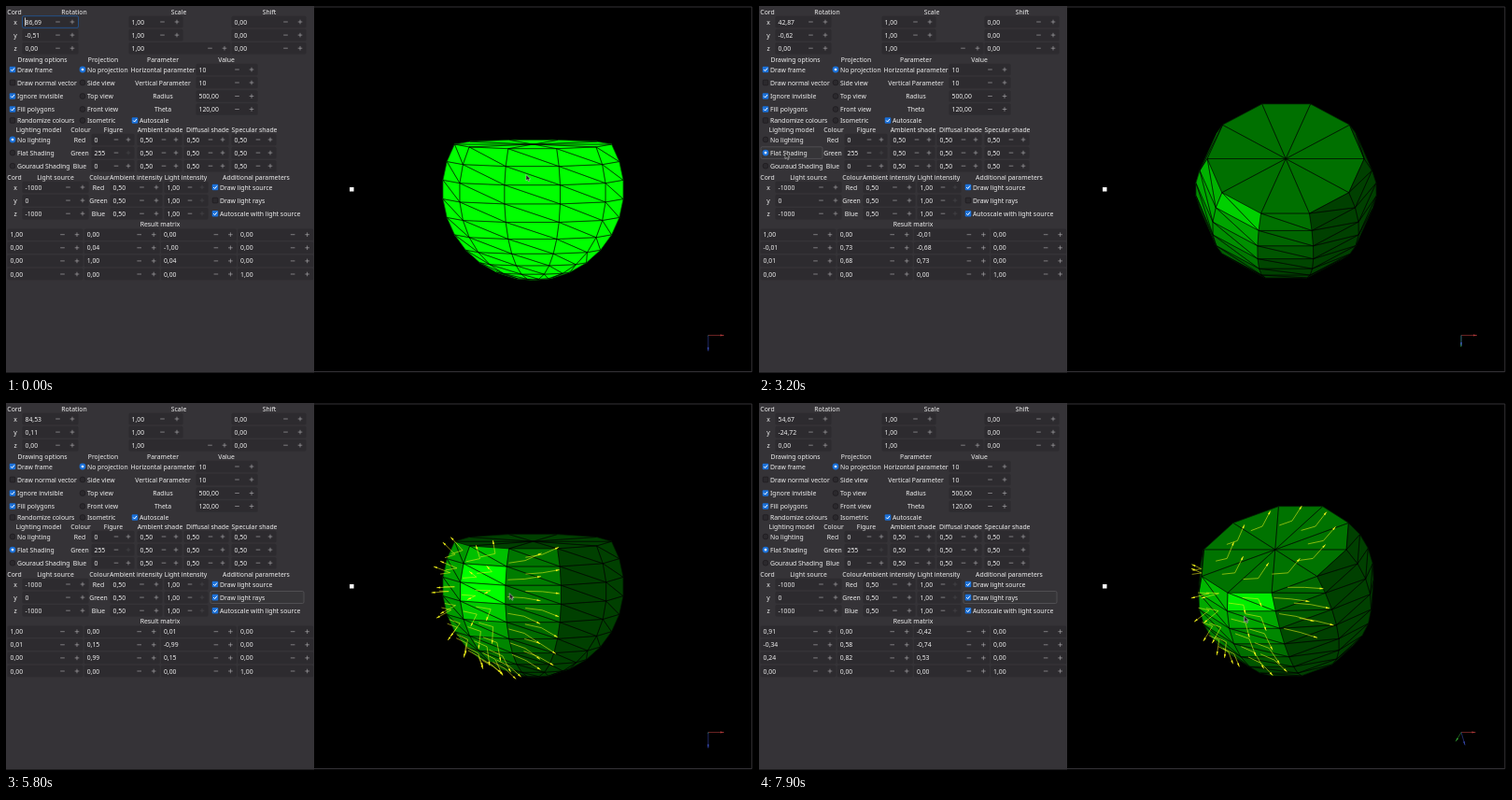
Write an HTML page with a canvas that moves like this. It is 800 px wide and 395 px high and loops after 8 s.

```html
<!DOCTYPE html>
<html lang="en">
<head>
<meta charset="utf-8">
<title>Spherical segment viewer</title>
<style>
  html, body { margin: 0; width: 800px; height: 395px; overflow: hidden; background: #000; }
  canvas, svg { position: absolute; left: 0; top: 0; display: block; }
  text { font: 6.85px "Noto Sans", "Open Sans", sans-serif; fill: #f0f0f0; white-space: pre; }
  .mid { text-anchor: middle; }
  .entry { fill: #2d2b2f; }
  .sign { stroke: #b4b3b5; stroke-width: .6; fill: none; }
  .dim { stroke: #4c4a4e; }
  .off { fill: #2b292d; stroke: #1d1b1f; stroke-width: .7; }
  .on { fill: #1c71d8; }
  .tick { fill: none; stroke: #fff; stroke-width: 1; }
  .focus { fill: none; stroke: #215a9c; stroke-width: .8; }
  .ring { fill: #39373b; fill-opacity: .4; stroke: #5b595d; stroke-width: .7; }
</style>
</head>
<body>
<canvas id="scene" width="800" height="395"></canvas>
<svg id="panel" width="800" height="395" viewBox="0 0 800 395"></svg>
<script>
const svg = document.getElementById('panel');
const ctx = document.getElementById('scene').getContext('2d');

// ---------- panel ----------
function add(tag, attrs, parent = svg) {
  const el = document.createElementNS('http://www.w3.org/2000/svg', tag);
  for (const key in attrs) el.setAttribute(key, attrs[key]);
  return parent.appendChild(el);
}
function label(x, y, str, cls = '') {
  const el = add('text', { x, y: y + 2.5, class: cls });
  el.textContent = str;
  return el;
}
const mid = (x, y, str) => label(x, y, str, 'mid');
const heads = (y, list) => list.forEach(([x, str]) => mid(x, y, str));

function entry(x, right, y, str, full) {
  const plus = right - 7, minus = plus - (right - x < 50 ? 13 : 15.5);
  add('rect', { x: x + .5, y: y - 6.3, width: right - x - 1, height: 12.6, rx: 1.5, class: 'entry' });
  add('path', { d: `M${minus - 2.3} ${y}h4.6`, class: 'sign' });
  add('path', { d: `M${plus - 2.3} ${y}h4.6m-2.3 -2.3v4.6`, class: full ? 'sign dim' : 'sign' });
  return label(x + 3.5, y, str);
}
function check(x, y, str, checked) {
  add('rect', { x: x - 2.8, y: y - 2.8, width: 5.6, height: 5.6, rx: 1, class: 'off' });
  const mark = add('g', {});
  add('rect', { x: x - 3.3, y: y - 3.3, width: 6.6, height: 6.6, rx: 1.2, class: 'on' }, mark);
  add('path', { d: `M${x - 1.8} ${y}l1.4 1.5l2.4 -3`, class: 'tick' }, mark);
  label(x + 5, y, str);
  show(mark, checked);
  return mark;
}
function radio(x, y, str, checked) {
  add('circle', { cx: x, cy: y, r: 2.9, class: 'off' });
  const mark = add('g', {});
  add('circle', { cx: x, cy: y, r: 3.4, class: 'on' }, mark);
  add('circle', { cx: x, cy: y, r: 1.3, fill: '#fff' }, mark);
  label(x + 5, y, str);
  show(mark, checked);
  return mark;
}
function show(el, visible) { el.style.display = visible ? '' : 'none'; }

add('rect', { width: 330, height: 392.5, fill: '#353337' });
add('path', { d: 'M330 1H798.8V391.5H330', fill: 'none', stroke: '#353337' });

heads(6, [[9, 'Cord'], [73, 'Rotation'], [185, 'Scale'], [282, 'Shift']]);
const angles = ['x', 'y', 'z'].map((axis, i) => {
  const y = 17 + 14.1 * i;
  mid(10, y, axis);
  entry(131, i < 2 ? 190 : 241, y, '1,00');
  entry(241, 322, y, '0,00');
  return entry(17, 78, y, '0,00');
});

heads(57, [[39, 'Drawing options'], [104, 'Projection'], [168, 'Parameter'], [236, 'Value']]);
const optionRows = [68, 82, 96.5, 110.5, 122.5];
[['Draw frame', true], ['Draw normal vector', false], ['Ignore invisible', true],
  ['Fill polygons', true], ['Randomize colours', false]]
  .forEach(([str, checked], i) => check(7, optionRows[i], str, checked));
['No projection', 'Side view', 'Top view', 'Front view', 'Isometric']
  .forEach((str, i) => radio(82, optionRows[i], str, i === 0));
[['Horizontal parameter', '10'], ['Vertical Parameter', '10'], ['Radius', '500,00'], ['Theta', '120,00']]
  .forEach(([str, val], i) => { mid(168, optionRows[i], str); entry(203, 270, optionRows[i], val); });
check(138, 122.5, 'Autoscale', true);

heads(132, [[35, 'Lighting model'], [80, 'Colour'], [115, 'Figure'], [165, 'Ambient shade'],
  [216, 'Diffusal shade'], [266, 'Specular shade']]);
const flatRing = add('rect', { x: 2, y: 150.8, width: 66, height: 12.6, rx: 1.5, class: 'ring' });
const colours = ['Red', 'Green', 'Blue'];
const models = ['No lighting', 'Flat Shading', 'Gouraud Shading'].map((str, i) => {
  const y = 143 + 14.1 * i;
  mid(79, y, colours[i]);
  entry(91, 138, y, i === 1 ? '255' : '0', i === 1);
  [140, 190, 241].forEach(x => entry(x, x + 49, y, '0,50'));
  return radio(7, y, str, false);
});

heads(183, [[9, 'Cord'], [53, 'Light source'], [100, 'Colour'], [139.3, 'Ambient intensity'],
  [192.5, 'Light intensity'], [268, 'Additional parameters']]);
const raysRing = add('rect', { x: 219, y: 201.5, width: 100, height: 13, rx: 1.5, class: 'ring' });
const extras = ['Draw light source', 'Draw light rays', 'Autoscale with light source'].map((str, i) => {
  const y = 194 + 14.1 * i;
  mid(10, y, 'xyz'[i]);
  entry(17, 89, y, i === 1 ? '0' : '-1000');
  mid(99, y, colours[i]);
  entry(111, 168, y, '0,50');
  entry(169, 217, y, '1,00', true);
  return check(224, y, str, true);
});

mid(165, 233.5, 'Result matrix');
const cells = [];
for (let r = 0; r < 4; r++)
  for (let c = 0; c < 4; c++)
    cells.push(entry(1 + 82.2 * c, 83 + 82.2 * c, 244.7 + 14.1 * r, r === 3 && c === 3 ? '1,00' : '0,00'));

const focus = add('rect', { x: 17.5, y: 10.7, width: 60, height: 12.6, rx: 1.5, class: 'focus' });
const caret = add('path', { d: 'M20.5 12.5v9', stroke: '#fff', 'stroke-width': .7 });
const pointer = add('path', { d: 'M0 0V6.6L1.6 5.2L2.8 7.6L3.9 7L2.8 4.8H4.8Z',
  fill: '#222', stroke: '#ddd', 'stroke-width': .5 });

// ---------- motion ----------
const TURN = [
  [-40, 87.7, 0], [0, 86.69, -.51], [400, 67, -14], [760, 43.95, -29.8], [800, 43.93, -31.71],
  [1000, 44, -36], [1400, 47, -20], [1900, 43.2, -2], [2300, 42.87, -.62], [4500, 42.87, -.62],
  [5260, 54.3, -.15], [5300, 56.02, -.12], [5600, 71, 1], [6000, 97, -2], [6360, 109.8, -14],
  [6400, 109.65, -15.56], [6700, 107, -28], [7000, 99, -35], [7360, 80.8, -30.7],
  [7400, 79.34, -29.85], [7700, 60, -25.5], [7850, 54.67, -24.72], [8000, 54.67, -24.72]];
const WALK = [[2600, 557, 217], [3100, 28, 157], [3500, 28, 157], [4000, 224, 206],
  [4100, 224, 206], [4450, 538.6, 238.8]];
const FLAT_AT = 3100, RAYS_AT = 4000;
const LAG = 40; // the matrix readout trails the figure

// monotone cubic through [time, a, b] keys
function follow(keys, t) {
  let i = 0;
  while (i < keys.length - 2 && keys[i + 1][0] <= t) i++;
  const h = keys[i + 1][0] - keys[i][0], u = (t - keys[i][0]) / h;
  return [1, 2].map(c => {
    const rate = n => (keys[n + 1][c] - keys[n][c]) / (keys[n + 1][0] - keys[n][0]);
    const tangent = n => {
      if (n === 0 || n === keys.length - 1) return 0;
      const a = rate(n - 1), b = rate(n);
      return a * b > 0 ? 2 * a * b / (a + b) : 0;
    };
    const p = keys[i][c], q = keys[i + 1][c], v = 1 - u;
    return p * v * v * (1 + 2 * u) + q * u * u * (3 - 2 * u) + h * u * v * (v * tangent(i) - u * tangent(i + 1));
  });
}
function pointerAt(t, [rx, ry]) {
  if (t <= 2600) return [557.4 + ry / 1.2, 180.5 + (86.69 - rx) / 1.22];
  if (t >= 4450) return [539 + (ry + .12) / 1.27, 227 + (56.02 - rx) / 1.22];
  return follow(WALK, t);
}

// ---------- solid ----------
const R = 500, SIDES = 10, RINGS = 10, SCALE = .194, CX = 564.5, CY = 196.5;
const LIGHT = [-1000, 0, -1000], RAY = 105;
const sum = (a, b, k = 1) => a.map((v, i) => v + k * b[i]);
const dot = (a, b) => a[0] * b[0] + a[1] * b[1] + a[2] * b[2];
const unit = a => a.map(v => v / Math.hypot(...a));
const cross = (a, b) => [a[1] * b[2] - a[2] * b[1], a[2] * b[0] - a[0] * b[2], a[0] * b[1] - a[1] * b[0]];
const centre = pts => pts.reduce((s, p) => sum(s, p, 1 / pts.length), [0, 0, 0]);

function point(side, ring) {
  const lon = side * 2 * Math.PI / SIDES, lat = ring * Math.PI * 2 / 3 / RINGS;
  return [R * Math.sin(lat) * Math.cos(lon), R * Math.sin(lat) * Math.sin(lon), R * Math.cos(lat)];
}
// each face is a list of coplanar triangles
const faces = [[]];
for (let s = 0; s < SIDES; s++) {
  faces[0].push([[0, 0, -R / 2], point(s, RINGS), point(s + 1, RINGS)]);
  for (let r = 0; r < RINGS; r++) {
    const a = point(s, r), b = point(s + 1, r), c = point(s + 1, r + 1), d = point(s, r + 1);
    faces.push(r ? [[a, b, c], [a, c, d]] : [[a, c, d]]);
  }
}

function matrix([rx, ry]) {
  const a = rx * Math.PI / 180, b = ry * Math.PI / 180;
  const c = Math.cos(a), s = Math.sin(a), cy = Math.cos(b), sy = Math.sin(b);
  return [[cy, 0, sy], [s * sy, c, -s * cy], [-c * sy, s, c * cy]];
}
const turn = (p, m) => [0, 1, 2].map(i => p[0] * m[0][i] + p[1] * m[1][i] + p[2] * m[2][i]);
const project = p => [CX + p[0] * SCALE, CY + p[1] * SCALE];
const mirror = (l, n) => sum(n.map(v => 2 * dot(n, l) * v), l, -1);

function shade(n, at) {
  const l = unit(sum(LIGHT, at, -1)), diffuse = dot(n, l);
  let k = .25;
  if (diffuse > 0) k += .5 * diffuse + .5 * Math.max(0, -mirror(l, n)[2]) ** 5;
  return `rgb(0,${Math.round(255 * Math.min(1, k))},0)`;
}
function trace(pts) {
  ctx.beginPath();
  pts.forEach(p => ctx.lineTo(p[0], p[1]));
}
function arrowHead([x0, y0], [x, y], len, half) {
  const d = Math.hypot(x - x0, y - y0);
  if (d < 2) return;
  const ux = (x - x0) / d, uy = (y - y0) / d;
  const bx = x - ux * len, by = y - uy * len;
  trace([[x, y], [bx - uy * half, by + ux * half], [bx + uy * half, by - ux * half]]);
  ctx.fill();
}
function drawRay(tri, n) {
  const at = centre(tri), l = unit(sum(LIGHT, at, -1));
  if (dot(n, l) <= 0) return;
  const hit = project(at), end = project(sum(at, mirror(l, n), RAY));
  trace([project(sum(at, l, RAY)), hit, end]);
  ctx.stroke();
  arrowHead(hit, end, 4, 1);
}
function drawAxes(m) {
  ['#b03a3a', '#2f9a2f', '#3546a8'].forEach((colour, i) => {
    const from = [752, 352.5], to = [752 + 17 * m[i][0], 352.5 + 17 * m[i][1]];
    ctx.strokeStyle = ctx.fillStyle = colour;
    ctx.lineWidth = .6;
    trace([from, to]);
    ctx.stroke();
    arrowHead(from, to, 4, 1);
  });
}
function drawScene(m, flat, rays) {
  ctx.fillStyle = '#000';
  ctx.fillRect(0, 0, 800, 395);
  const visible = [];
  ctx.lineJoin = 'round';
  for (const face of faces) {
    const tris = face.map(t => t.map(p => turn(p, m)));
    const [a, b, c] = tris[0];
    let n = unit(cross(sum(b, a, -1), sum(c, a, -1)));
    if (dot(n, a) < 0) n = n.map(v => -v);
    if (n[2] >= 0) continue;
    // the thin stroke in the fill colour closes seams between triangles
    ctx.fillStyle = ctx.strokeStyle = flat ? shade(n, centre(tris.flat())) : '#0f0';
    ctx.lineWidth = .4;
    for (const tri of tris) {
      trace(tri.map(project));
      ctx.closePath();
      ctx.fill();
      ctx.stroke();
      visible.push([tri, n]);
    }
  }
  ctx.strokeStyle = '#000';
  ctx.lineWidth = .42;
  for (const [tri] of visible) {
    trace(tri.map(project));
    ctx.closePath();
    ctx.stroke();
  }
  if (rays) {
    ctx.strokeStyle = ctx.fillStyle = '#f4f41c';
    ctx.lineWidth = .55;
    visible.forEach(([tri, n]) => drawRay(tri, n));
  }
  ctx.fillStyle = '#fff';
  ctx.fillRect(368, 194, 4.5, 4.5);
  drawAxes(m);
}

// ---------- playback ----------
const number = v => v.toFixed(2).replace(/^-(0\.00)$/, '$1').replace('.', ',');

function render(t) {
  const angle = follow(TURN, t);
  const flat = t >= FLAT_AT, rays = t >= RAYS_AT;
  angle.forEach((v, i) => angles[i].textContent = number(v));
  matrix(follow(TURN, t - LAG)).forEach((row, r) =>
    row.forEach((v, c) => cells[r * 4 + c].textContent = number(v)));
  show(models[0], !flat);
  show(models[1], flat);
  show(models[2], false);
  show(extras[1], rays);
  show(flatRing, flat && t < 3600);
  show(raysRing, rays);
  show(focus, !flat);
  show(caret, !flat && t % 1200 < 600);
  pointer.setAttribute('transform', `translate(${pointerAt(t, angle)})`);
  drawScene(matrix(angle), flat, rays);
}

let last = -1;
function tick() {
  const t = Math.floor(performance.now() % 8000 / 100) * 100;
  if (t !== last) render(last = t);
  requestAnimationFrame(tick);
}
tick();
</script>
</body>
</html>
```
